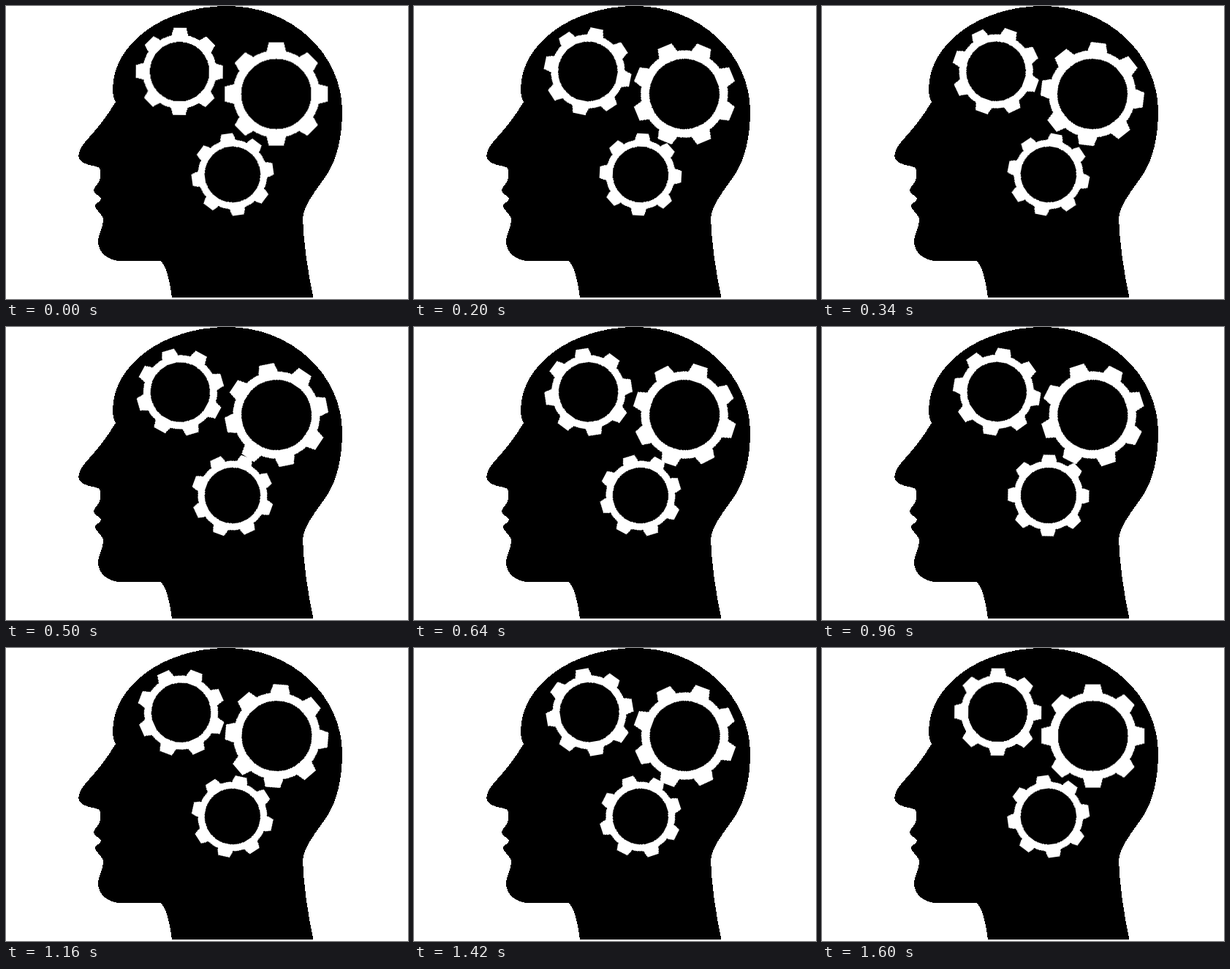
These frames come from a looping animation (550 px wide and 400 px high, 1620 ms). An HTML page:

```html
<!DOCTYPE html>
<html lang="en">
<head>
<meta charset="utf-8">
<title>Thinking head</title>
<style>
  html, body { margin: 0; width: 100%; height: 100%; overflow: hidden; background: #fff; }
  svg { display: block; width: 100vw; height: 100vh; shape-rendering: crispEdges; }
  .gear { animation: turn 1620ms steps(81, jump-none) infinite; }
  .front { --a: 237.5px, 89.6px; --b: 240.4px, 87.6px; --r0: 0.5deg; --r1: 90.5deg; --s: .598; }
  .back  { --a: 369.8px, 120.1px; --b: 370.7px, 120.1px; --r0: 0deg; --r1: -180deg; --s: .705; }
  .low   { --a: 310px, 230px; --b: 309.8px, 230px; --r0: -8deg; --r1: 82deg; --s: .56; }
  @keyframes turn {
    from { transform: translate(var(--a)) rotate(var(--r0)) scale(var(--s)); }
    to   { transform: translate(var(--b)) rotate(var(--r1)) scale(var(--s)); }
  }
</style>
</head>
<body>
<svg viewBox="0 0 550 400">
  <defs>
    <path id="tooth" d="M-19.5-81L-14.5-99.5H14.5L19.5-81Z"/>
    <g id="pair">
      <use href="#tooth"/>
      <use href="#tooth" transform="rotate(180)"/>
    </g>
    <g id="gear" fill="#fff">
      <circle r="84.5"/>
      <circle r="68.1" fill="#000"/>
      <use href="#pair"/>
      <use href="#pair" transform="rotate(45)"/>
      <use href="#pair" transform="rotate(90)"/>
      <use href="#pair" transform="rotate(135)"/>
    </g>
  </defs>
  <path d="M303 0A157 144 0 0 1 460 144
    C460 178 453 207 441 227C429 246 407 270 406 290
    C407 322 413 364 420.500 398H227C224 375 219 353 211 348
    H157C140 348 125 336 126 320C127 309 134 301 133 290
    C131 284 122 277 121.500 273C122 269 130 267 130 263
    C128 259 120 256 120 251C121 246 128 243 129 234
    C129 230 130 225 128 221C122 217 101 218 99 205
    C100 194 107 187 114 179C126 166 139 149 150 131
    C147 126 146 119 146 114A157 114 0 0 1 303 0Z"/>
  <use class="gear front" href="#gear"/>
  <use class="gear back" href="#gear"/>
  <use class="gear low" href="#gear"/>
</svg>
</body>
</html>
```
